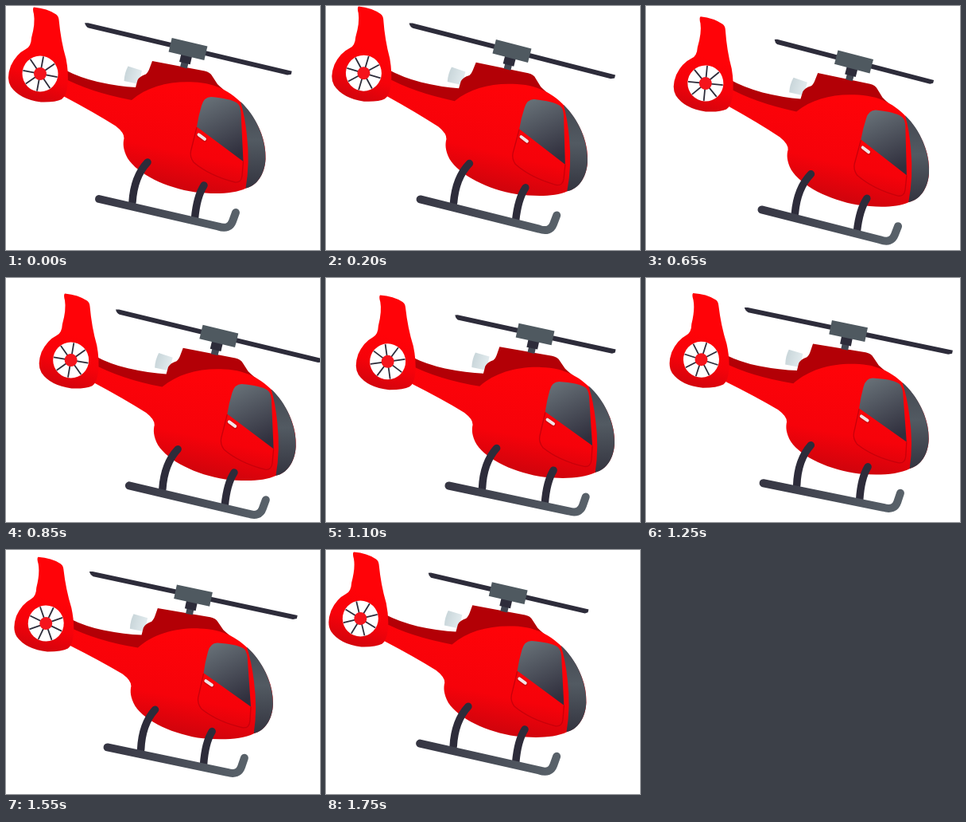
An HTML page for the animation above (1800 ms loop, 395 by 306 pixels).

```html
<!DOCTYPE html>
<html lang="en">
<head>
<meta charset="utf-8">
<title>Helicopter</title>
<style>
  html, body { margin: 0; width: 100%; height: 100%; overflow: hidden; background: #fff; }
  svg { display: block; width: 395px; height: 306px; }
</style>
</head>
<body>
<svg viewBox="0 0 395 306">
  <defs>
    <linearGradient id="red" gradientUnits="userSpaceOnUse" x1="225" y1="95" x2="195" y2="238">
      <stop offset="0" stop-color="#ff0308"/>
      <stop offset=".6" stop-color="#f6020a"/>
      <stop offset="1" stop-color="#c4040d"/>
    </linearGradient>
    <linearGradient id="tail" gradientUnits="userSpaceOnUse" x1="52" y1="55" x2="32" y2="122">
      <stop offset="0" stop-color="#ff0308"/>
      <stop offset=".5" stop-color="#f6020a"/>
      <stop offset="1" stop-color="#cf040d"/>
    </linearGradient>
    <linearGradient id="glass" gradientUnits="userSpaceOnUse" x1="250" y1="118" x2="284" y2="190">
      <stop offset="0" stop-color="#666f76"/>
      <stop offset="1" stop-color="#302f3d"/>
    </linearGradient>
    <linearGradient id="nose" gradientUnits="userSpaceOnUse" x1="308" y1="130" x2="310" y2="226">
      <stop offset="0" stop-color="#474c55"/>
      <stop offset=".4" stop-color="#525a62"/>
      <stop offset="1" stop-color="#353641"/>
    </linearGradient>
    <linearGradient id="pipe" gradientUnits="userSpaceOnUse" x1="150" y1="84" x2="169" y2="90">
      <stop offset="0" stop-color="#c9d6da"/>
      <stop offset="1" stop-color="#e2ebee"/>
    </linearGradient>
    <linearGradient id="skid" gradientUnits="userSpaceOnUse" x1="115" y1="242" x2="292" y2="270">
      <stop offset="0" stop-color="#363643"/>
      <stop offset="1" stop-color="#59626a"/>
    </linearGradient>
  </defs>

  <g id="craft">
    <path fill="url(#pipe)" d="M153.500 75.500L171 81L167 98L148.500 94Q149 84 153.500 75.500Z"/>
    <path fill="#b30006" d="M74 80Q92 89.500 115 95Q142 101 163 102L165.500 93Q168 88 176 85.500Q179 83 181 77L184 69L250 81.500Q257 83 259.500 88L266 98Q272 104 284 113L200 135L140 125L72 96Z"/>

    <path fill="url(#red)" d="M70 89Q105 108 158 118C178 101 206 94 236 95.500C266 96.500 287 109.500 303.500 129.500C319 149 327.500 170 326.500 192C325.500 212 315 225 302 228.500C286 236 262 236 238 233.500C201 228 166 211 153 191C147 180 147 172 148.500 166Q149 159 138 150.500Q110 133 73 113.500Z"/>
    <path fill="url(#tail)" d="M35 1.500Q52 3 63 10.500Q66 12.500 66.500 17Q69 44 75.500 66Q79 84 77.500 99Q76 113 70 117Q62 121 44 120.500Q17 117 6 101Q0 91 6 75Q13 60 25 54Q31.500 51 32 40Q37 22 35 10Q33 3 35 1.500Z"/>

    <circle cx="43" cy="85" r="22.500" fill="#fff"/>
    <g id="spokes" stroke="#2d2c3a" stroke-width="1.800"></g>
    <circle cx="43" cy="85" r="8" fill="#f5141c"/>

    <path fill="url(#nose)" d="M295 120C314 137 327.500 166 326.500 192C325.500 212 315 226 301.500 228.500Q307 197 303 162Q300.500 138 295 120Z"/>
    <path fill="none" stroke="#c8000a" stroke-width="1.300" d="M240 152L232.500 182Q231 189 236 196Q256 213 288 221Q296 222 297 213L298.500 195"/>
    <path fill="url(#glass)" d="M298.500 195L240 151.500Q242 138 246 125Q249 114 258 114Q282 116 290.500 121.500Q294.500 124 295.500 133Z"/>
    <path stroke="#d50009" stroke-width="6" stroke-linecap="round" d="M242.500 162L250 167.500"/>
    <path stroke="#f3e3e5" stroke-width="4" stroke-linecap="round" d="M242.500 161.300L250 166.800"/>

    <g fill="none" stroke-linecap="round">
      <path stroke="#2d2c3a" stroke-width="9.500" d="M178 196Q161 214 159 246M249 225Q240 239 237.500 266"/>
      <path stroke="url(#skid)" stroke-width="10" d="M117 242L267 276.500Q281 281 285 270L289 259"/>
    </g>

    <g transform="translate(229 54) rotate(13.300)">
      <path fill="#414752" d="M-4.500 17H4.500V24H-4.500Z"/>
      <path fill="#2d2c3a" d="M-7 7H7V18H-7Z"/>
      <path id="blades" fill="#2d2c3a" d="M-134-2L-130-3H133.500V1L129 3H-128Q-132 2-134-2Z"/>
      <rect x="-23" y="-9" width="46" height="18" fill="#4f5960"/>
    </g>
  </g>
</svg>
<script>
  const LOOP = 1800, STEP = 50, FRAMES = LOOP / STEP, BEATS = 38;
  const [craft, spokes, blades] = ['craft', 'spokes', 'blades'].map(id => document.getElementById(id));

  spokes.innerHTML = [0, 45, 90, 135]
    .map(a => `<path d="M21 85H65" transform="rotate(${a} 43 85)"/>`).join('');

  function draw(ms) {
    const frame = Math.floor(ms % LOOP / STEP);
    const angle = 2 * Math.PI * frame / FRAMES;
    const drift = 1 - Math.cos(angle);
    const tilt = 1.6 * Math.sin(angle);
    craft.setAttribute('transform',
      `translate(${19.5 * drift} ${9.5 * drift}) rotate(${tilt} 215 75)`);

    // Each beat flips the blade length and turns the tail rotor half a spoke gap.
    const beat = frame * BEATS / FRAMES + 0.25;
    const wide = Math.floor(beat) % 2 === 0;
    blades.setAttribute('transform', `scale(${wide ? 1 : 0.773} 1)`);
    spokes.setAttribute('transform', `rotate(${22.5 * beat + 5} 43 85)`);
  }

  const start = performance.now();
  function tick() {
    draw(performance.now() - start);
    requestAnimationFrame(tick);
  }
  draw(0);
  requestAnimationFrame(tick);
</script>
</body>
</html>
```
